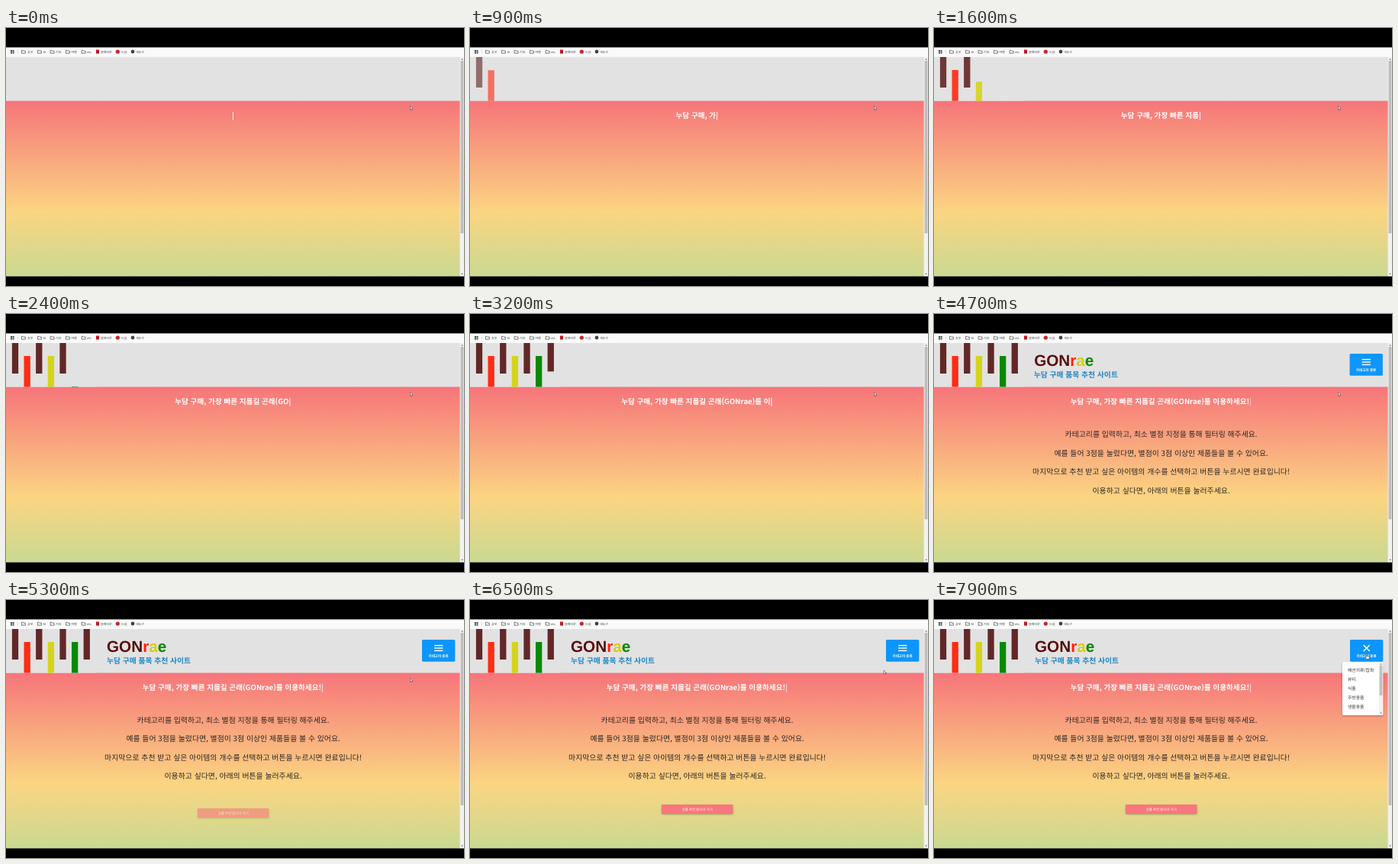
An HTML page that plays this animation: 600 px wide and 338 px high, repeating every 8000 ms.

```html
<!DOCTYPE html>
<html lang="ko">
<head>
<meta charset="utf-8">
<title>구매 품목 추천 사이트</title>
<style>
  html, body { margin: 0; width: 100%; height: 100%; overflow: hidden; background: #000; }
  svg { display: block; width: 600px; height: 338px; }
  text { font-family: "Noto Sans CJK KR", "Noto Sans CJK", "Noto Sans CJK JP", sans-serif;
         white-space: pre; text-rendering: geometricPrecision; }
  .mid { text-anchor: middle; }
  .bold { font-weight: 700; }
  #logo { font: 700 20.7px "Liberation Sans", Arial, sans-serif; }
</style>
</head>
<body>
<svg viewBox="0 0 600 338">
  <defs>
    <linearGradient id="sky" x1="0" y1="0" x2="0" y2="1">
      <stop offset="0" stop-color="#f6757a"/>
      <stop offset=".63" stop-color="#fbd582"/>
      <stop offset="1" stop-color="#c9d992"/>
    </linearGradient>
    <clipPath id="header"><rect y="38" width="595" height="57.5"/></clipPath>
    <filter id="shadow" x="-10%" y="-30%" width="120%" height="170%">
      <feDropShadow dx="0" dy="1" stdDeviation="1" flood-opacity=".3"/>
    </filter>
    <path id="folder" d="M.4 1h1.8l.7.8h2.5v3H.4z" fill="none" stroke="#444" stroke-width=".7"/>
  </defs>

  <rect y="25.4" width="600" height="13" fill="#fafafa"/>
  <g id="bookmarks" font-size="4" fill="#444">
    <path d="M6 29h2v2H6zm2.6 0h2v2h-2zM6 31.6h2v2H6zm2.6 0h2v2h-2z"/>
    <path d="M15.5 28.5v5" stroke="#ccc" stroke-width=".6"/>
    <rect x="118" y="28.5" width="4" height="5" fill="#c0161c"/>
    <circle cx="146.3" cy="31" r="2.6" fill="#cf2027"/>
    <circle cx="166" cy="31" r="2.4" fill="#444"/>
  </g>

  <rect y="38" width="595" height="58" fill="#e2e2e2"/>
  <rect y="95.5" width="595" height="229.9" fill="url(#sky)"/>

  <g clip-path="url(#header)">
    <text id="logo" x="132" y="68.4" fill="#5a0c0c">GON<tspan fill="#ff1e0c">r</tspan><tspan fill="#d3d012">a</tspan><tspan fill="#0a8508">e</tspan></text>
    <text id="slogan" class="bold" x="132" y="82.5" font-size="9.8" fill="#1b86c9">누담 구매 품목 추천 사이트</text>
    <g id="keys">
      <rect y="38" width="119" height="58" fill="#e2e2e3" opacity=".85"/>
    </g>
  </g>

  <text id="title" class="mid bold" x="297.3" y="118.2" font-size="9.6" fill="#fff"><tspan id="typed"></tspan><tspan id="caret">|</tspan></text>
  <g id="lines" class="mid" font-size="9.9" fill="#2b2523"></g>

  <g id="go">
    <rect x="251" y="268" width="93.5" height="12" rx="1" fill="#f7777c" filter="url(#shadow)"/>
    <text class="mid" x="297.7" y="275.7" font-size="4.4" fill="#fff">상품 추천 받으러 가기</text>
  </g>

  <g id="menu">
    <rect x="545" y="52" width="43.3" height="28.8" rx="1.5" fill="#0d96fa"/>
    <g stroke="#fff" stroke-width="1.4">
      <path id="top" d="M561 0h11.4"/>
      <path id="middle" d="M561 63h11.4"/>
      <path id="bottom" d="M561 0h11.4"/>
    </g>
    <text class="mid bold" x="566.6" y="74.6" font-size="4.5" fill="#fff">카테고리 종류</text>
  </g>

  <g id="panel">
    <rect x="535" y="81" width="53.3" height="70" rx="1.5" fill="#fff" filter="url(#shadow)"/>
    <rect x="583" y="81.5" width="5" height="69" fill="#f1f1f1"/>
    <rect x="583.6" y="86" width="3.8" height="39" fill="#c1c1c1"/>
    <path d="M584.3 84.8l1.2-1.5 1.2 1.5zm0 62.7l1.2 1.5 1.2-1.5z" fill="#666"/>
    <g id="items" font-size="5.8" fill="#333"></g>
  </g>

  <rect x="594.6" y="38" width="5.4" height="287.4" fill="#f1f1f1"/>
  <rect x="595.6" y="43" width="3.8" height="226" fill="#bdbdbd"/>
  <path d="M596.3 41.5l1.3-1.6 1.3 1.6zm0 280l1.3 1.6 1.3-1.6z" fill="#555"/>

  <g id="mouse" stroke="#333" stroke-width=".5" fill="#fff">
    <path id="arrow" d="M0 0v4.6l1.1-1 .8 1.7.8-.4-.8-1.6h1.5z"/>
    <path id="hand" d="M-.6.1q.6-.6 1.1 0v2l2.2.5q.8.3.6 1.2l-.6 2.2H-.4L-2 3.8q-.2-.9.7-.7l.7.5z"/>
  </g>
</svg>
<script>
const LOOP = 8000;
const TITLE = '누담 구매, 가장 빠른 지름길 곤래(GONrae)를 이용하세요!';
const $ = id => document.getElementById(id);
const clamp = x => Math.min(1, Math.max(0, x));

function add(parent, tag, attrs, text = '') {
  const el = document.createElementNS('http://www.w3.org/2000/svg', tag);
  for (const k in attrs) el.setAttribute(k, attrs[k]);
  el.textContent = text;
  return $(parent).appendChild(el);
}

// The CSS "ease" curve, solved by bisection
function ease(x) {
  if (x <= 0 || x >= 1) return clamp(x);
  const curve = (s, a, b) => 3 * (1 - s) ** 2 * s * a + 3 * (1 - s) * s * s * b + s ** 3;
  let lo = 0, hi = 1;
  for (let i = 0; i < 20; i++) {
    const s = (lo + hi) / 2;
    if (curve(s, .25, .25) < x) lo = s; else hi = s;
  }
  return curve(lo, .1, 1);
}

for (const x of [20, 41, 57.7, 78, 98.7])
  add('bookmarks', 'use', { href: '#folder', x, y: 28.3 });
[['공부', 28], ['AI', 48.5], ['기타', 65], ['여행', 85.3], ['etc.', 106],
 ['영화마루', 124], ['누담', 151], ['새도구', 170]]
  .forEach(([name, x]) => add('bookmarks', 'text', { x, y: 32.6 }, name));

const lines = [
  '카테고리를 입력하고, 최소 별점 지정을 통해 필터링 해주세요.',
  '예를 들어 3점을 눌렀다면, 별점이 3점 이상인 제품들을 볼 수 있어요.',
  '마지막으로 추천 받고 싶은 아이템의 개수를 선택하고 버튼을 누르시면 완료입니다!',
  '이용하고 싶다면, 아래의 버튼을 눌러주세요.'
];
lines.forEach((s, i) => add('lines', 'text', { x: 297.6, y: 160.8 + i * 24.5 }, s));

['패션의류/잡화', '뷰티', '식품', '주방용품', '생활용품']
  .forEach((s, i) => add('items', 'text', { x: 542, y: 93.7 + i * 12.1 }, s));

const brown = '#632727';
const keys = [brown, '#ff2b14', brown, '#d4d41c', brown, '#058908', brown].map((fill, i) =>
  add('keys', 'rect', { x: 7.9 + i * 15.62, y: i % 2 ? 55 : 38, width: 8.3, height: i % 2 ? 41 : 40, fill }));

function place(el, x, y, opacity = 1) {
  el.setAttribute('transform', `translate(${x} ${y})`);
  el.setAttribute('opacity', opacity);
}

function draw(t) {
  $('typed').textContent = TITLE.slice(0, Math.floor(t / 105));
  const phase = ((t + 380) / 700) % 1;
  const blink = Math.abs(1 - 2 * phase);
  $('caret').setAttribute('opacity', t < 3700 ? 1 : blink * blink * (3 - 2 * blink));

  $('keys').setAttribute('opacity', ease(t / 2500));
  keys.forEach((key, i) => {
    const left = 1 - ease((t - i * 480 + 20) / 500);
    place(key, 0, left * (i % 2 ? 41 : -40));
  });

  const shown = ease((t - 3840) / 1000);
  place($('logo'), -77 * (1 - shown), 0, shown);
  place($('slogan'), -108 * (1 - shown), 0, shown);
  place($('menu'), -38 * (1 - shown), 0, shown);
  place($('lines'), 0, 20 * (1 - shown), shown);

  const go = ease((t - 4950) / 1000);
  place($('go'), 0, 13 * (1 - go), go);

  const open = ease((t - 7300) / 250);
  $('panel').setAttribute('opacity', open);
  $('middle').setAttribute('opacity', 1 - open);
  const bar = (id, side) => $(id).setAttribute('transform',
    `translate(0 ${63 + side * 3.4 * (1 - open)}) rotate(${-45 * side * open} 566.7 0)`);
  bar('top', -1);
  bar('bottom', 1);

  const move = clamp((t - 6300) / 600);
  const y = 102.5 - 31 * move;
  place($('mouse'), 529.5 + 37.5 * move, y);
  $('arrow').setAttribute('opacity', y > 81 ? 1 : 0);
  $('hand').setAttribute('opacity', y > 81 ? 0 : 1);
}

const start = performance.now();
function tick() {
  draw((performance.now() - start) % LOOP);
  requestAnimationFrame(tick);
}
tick();
</script>
</body>
</html>
```
